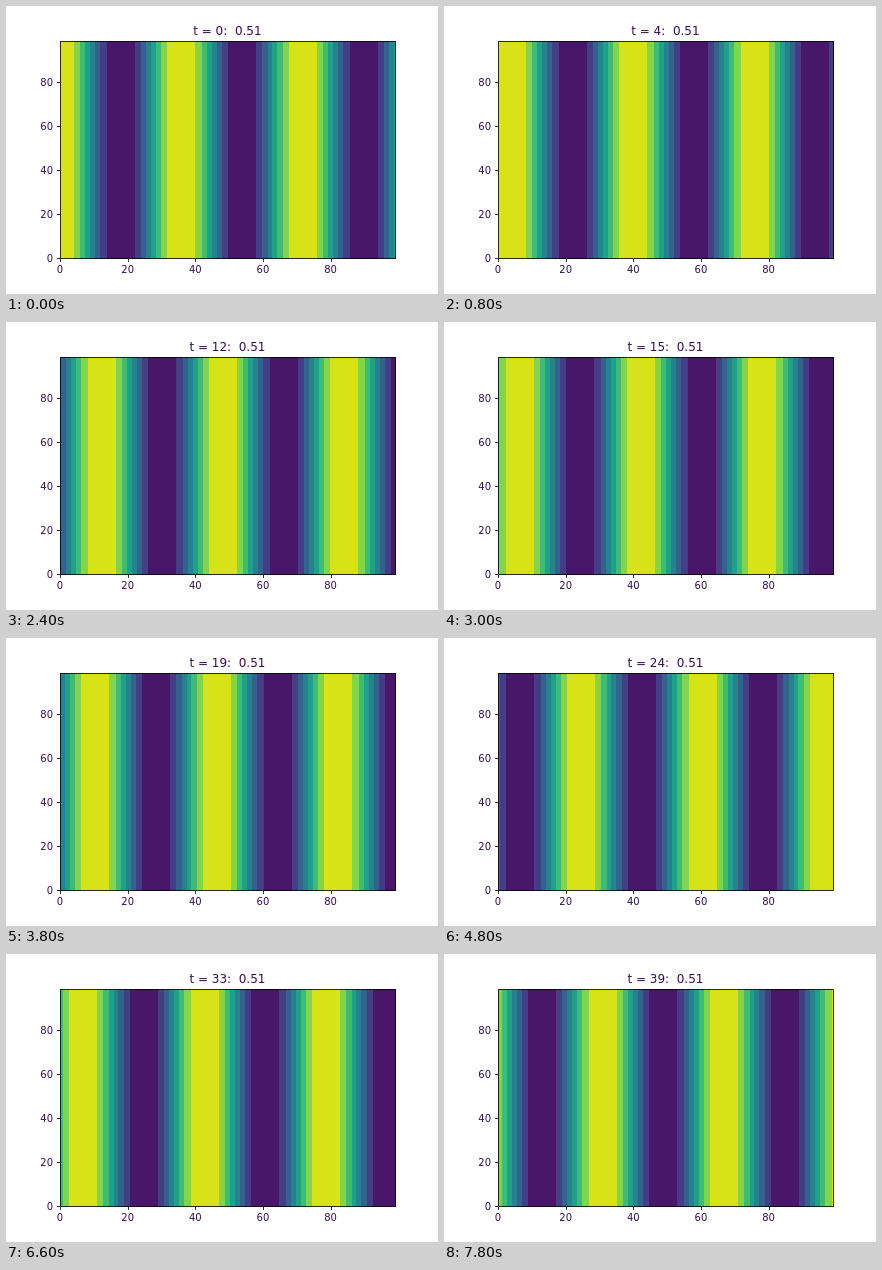
These frames come from a looping animation (432x288 px, 8000 ms). An HTML page with a canvas:

```html
<!DOCTYPE html>
<html lang="en">
<head>
<meta charset="utf-8">
<title>Travelling wave</title>
<style>
  html, body { margin: 0; width: 100%; height: 100%; overflow: hidden; background: #fff; }
  canvas { display: block; }
</style>
</head>
<body>
<canvas id="plot" width="432" height="288"></canvas>
<script>
const ctx = document.getElementById('plot').getContext('2d');
const LEFT = 54, RIGHT = 388.8, TOP = 34.56, BOTTOM = 252;
const MAX = 99, STEP_MS = 200, STEPS = 40;
const WAVE_NUMBER = 0.175, SPEED = 10;
const BANDS = ['#481769', '#433e85', '#33638d', '#26828e',
               '#1fa088', '#3fbc73', '#84d44b', '#d8e219'];
const INK = '#34104f', LINE = 'rgba(0,0,0,.8)';

const toX = v => LEFT + v / MAX * (RIGHT - LEFT);
const toY = v => BOTTOM - v / MAX * (BOTTOM - TOP);

function text(str, x, y, size, align) {
  ctx.font = `${size}px "DejaVu Sans", sans-serif`;
  ctx.textAlign = align;
  ctx.fillStyle = INK;
  ctx.fillText(str, x, y);
}

function drawWave(t) {
  for (let x = 54; x < 390; x++) {
    const cell = (x + 0.5 - LEFT) / (RIGHT - LEFT) * MAX;
    const value = Math.cos(WAVE_NUMBER * (cell - SPEED * t));
    ctx.fillStyle = BANDS[Math.min(7, Math.floor((value + 1) * 4))];
    ctx.fillRect(x, 35, 1, 218);
  }
}

function drawAxes() {
  ctx.strokeStyle = LINE;
  ctx.lineWidth = 1;
  ctx.strokeRect(54.5, 35.5, 335, 217);
  for (let v = 0; v <= 80; v += 20) {
    const x = toX(v), y = toY(v);
    ctx.fillStyle = LINE;
    ctx.fillRect(Math.round(x), 253, 1, 3);
    ctx.fillRect(51, Math.round(y), 3, 1);
    text(v, x, 267, 10, 'center');
    text(v, 47, Math.round(y) + 4, 10, 'right');
  }
}

function draw(now) {
  const t = Math.floor(now / STEP_MS) % STEPS;
  ctx.fillStyle = '#fff';
  ctx.fillRect(0, 0, 432, 288);
  drawWave(t);
  drawAxes();
  text(`t = ${t}:  0.51`, (LEFT + RIGHT) / 2, 29, 12, 'center');
  requestAnimationFrame(() => draw(performance.now()));
}
draw(performance.now());
</script>
</body>
</html>
```
